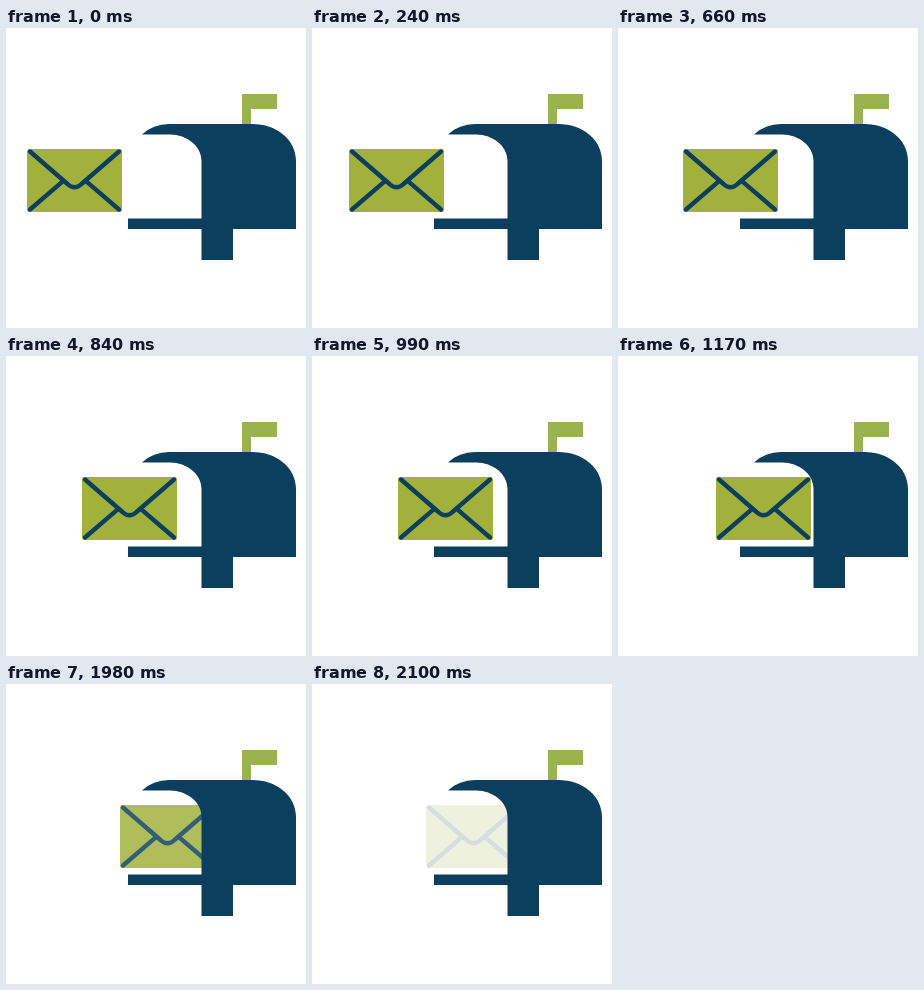
An HTML page that plays this animation: 300 px wide and 300 px high, repeating every 2130 ms.

```html
<!DOCTYPE html>
<html lang="en">
<head>
<meta charset="utf-8">
<title>Letter into mailbox</title>
<style>
  html, body { margin: 0; width: 100%; height: 100%; overflow: hidden; background: #fff; }
  svg { display: block; width: 100vw; height: 100vh; }
</style>
</head>
<body>
<svg viewBox="0 0 300 300">
  <g id="letter">
    <rect x="21" y="121" width="95" height="63" rx="2.5" fill="#a1b13b"/>
    <g fill="none" stroke="#0c3f5d" stroke-width="4.4" stroke-linecap="round">
      <path d="M24 123.5L61.5 156Q68.5 162.5 75.5 156L113 123.5"/>
      <path d="M24 181.5L57 153.2M113 181.5L80 153.2" />
    </g>
  </g>
  <path fill="#9bb250" d="M236 66H271V81H245V97H236Z"/>
  <path fill="#0c3f5d" d="M136 106.5Q147 96 163 96H246C271 96 290 112 290 133V201H227V232H195.500V201H122V190.500H195.500V133C195.500 118 181 106.500 164 106.500Z"/>
</svg>
<script>
  const LOOP = 2130, STEP = 30;
  const SLIDE_END = 1410, TRAVEL = 93;
  const FADE_START = 1950, FADE_TIME = 180;
  const letter = document.getElementById('letter');
  const clamp = v => Math.min(1, Math.max(0, v));

  function draw(time) {
    const t = Math.floor((time % LOOP) / STEP) * STEP;
    const x = Math.round(TRAVEL * clamp(t / SLIDE_END));
    letter.setAttribute('transform', `translate(${x} 0)`);
    letter.setAttribute('opacity', 1 - clamp((t - FADE_START) / FADE_TIME));
  }

  const start = performance.now();
  function tick() {
    draw(performance.now() - start);
    requestAnimationFrame(tick);
  }
  tick();
</script>
</body>
</html>
```
